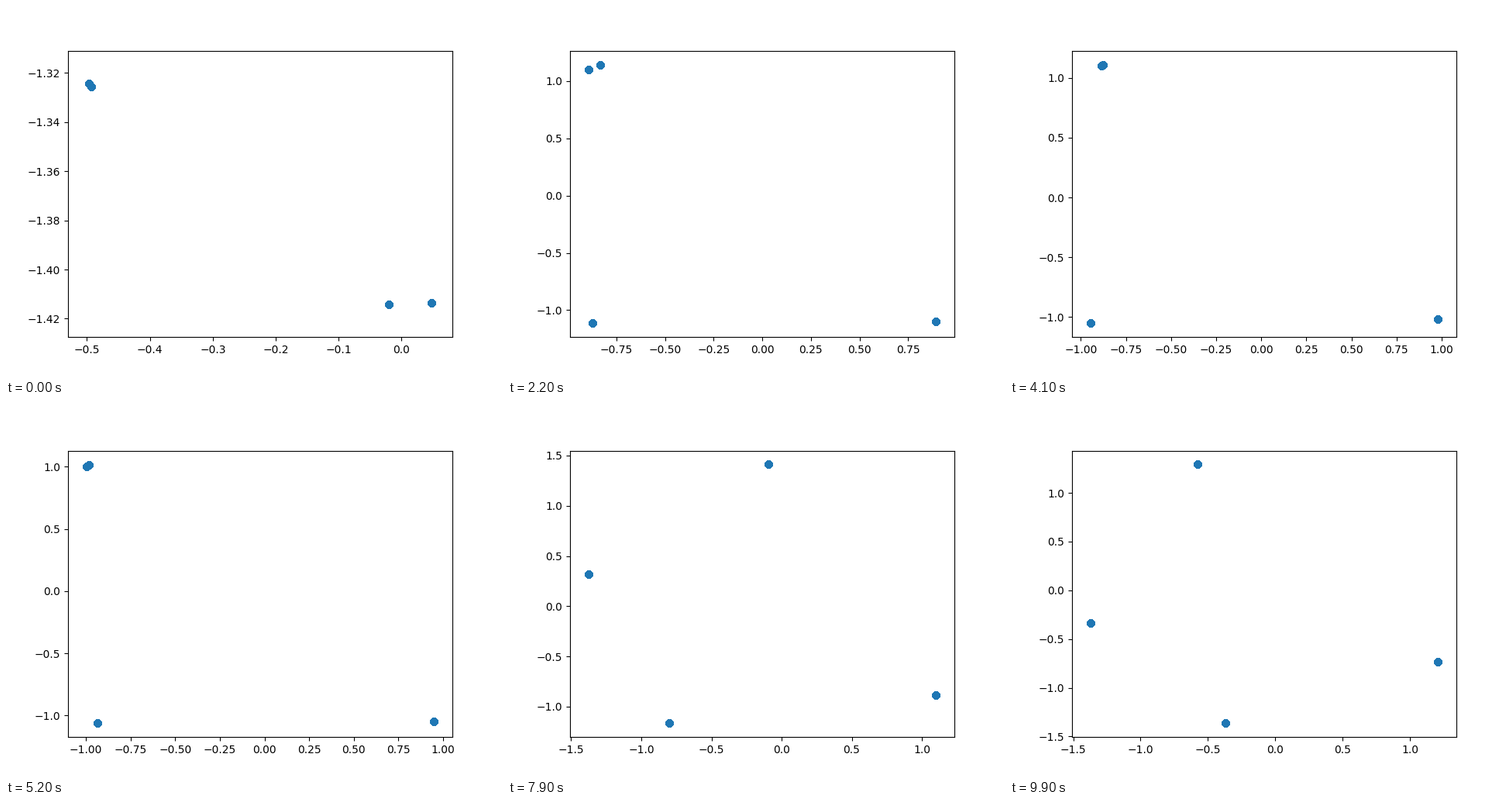
A matplotlib script that plays this animation: 640 px wide and 480 px high, repeating every 10000 ms.

```python
import numpy as np
import matplotlib.pyplot as plt
from matplotlib.animation import FuncAnimation

FRAMES, INTERVAL = 100, 100
RADIUS = np.sqrt(2)
OVERDRAW = 200              # coincident samples harden the marker edges
PAD_X, PAD_Y = 3 / 496, 3 / 369.6
MARGIN = 0.05


def overshoot(s, turn=1.12 * np.pi):
    return (1 - np.cos(turn * s)) / (1 - np.cos(turn))


def settle(rate):
    """Exponential approach; a negative rate speeds up instead."""
    return lambda s: np.expm1(-rate * s) / np.expm1(-rate)


def linear(s):
    return s


# Frame, easing into the pose, angle in degrees of each dot on the circle.
POSES = [
    (0, linear, (-90.8, -88.1, 249.46, 249.6)),
    (14, overshoot, (-91, -63, 123.5, 100.8)),
    (30, settle(4), (-133.1, -49.3, 129.87, 129.42)),
    (41, linear, (-132, -46.19, 128.69, 128.24)),
    (63, linear, (-130.77, -45, 137.52, 133.46)),
    (79, settle(1.2), (-124.5, -38.87, 166.95, 93.87)),
    (99, settle(-1), (-105.2, -31.25, 193.8, 114.1)),
]
# Late swing that leaves a pose and returns before the next one.
SWING_START, SWING_END = 41, 63
SWING = np.array([0, -4.6, 3.4, 6.4])


def pose(t):
    for (t0, _, a), (t1, ease, b) in zip(POSES, POSES[1:]):
        if t <= t1:
            break
    a, b = np.array(a), np.array(b)
    deg = a + (b - a) * ease((t - t0) / (t1 - t0))
    s = np.clip((t - SWING_START) / (SWING_END - SWING_START), 0, 1)
    deg = deg + SWING * np.sin(np.pi * s * s) ** 2
    rad = np.radians(deg)
    return RADIUS * np.cos(rad), RADIUS * np.sin(rad)


def limits(v, pad):
    lo, hi = v.min() - pad, v.max() + pad
    extra = MARGIN * (hi - lo)
    return lo - extra, hi + extra


fig, ax = plt.subplots(figsize=(6.4, 4.8), dpi=100)
dots = ax.scatter([], [], color="#1f77b4")


def draw(i):
    x, y = pose(i)
    dots.set_offsets(np.repeat(np.column_stack([x, y]), OVERDRAW, axis=0))
    ax.set_xlim(limits(x, PAD_X))
    ax.set_ylim(limits(y, PAD_Y))
    return dots,


anim = FuncAnimation(fig, draw, frames=FRAMES, interval=INTERVAL,
                     repeat=True, repeat_delay=0)
plt.show()
```
